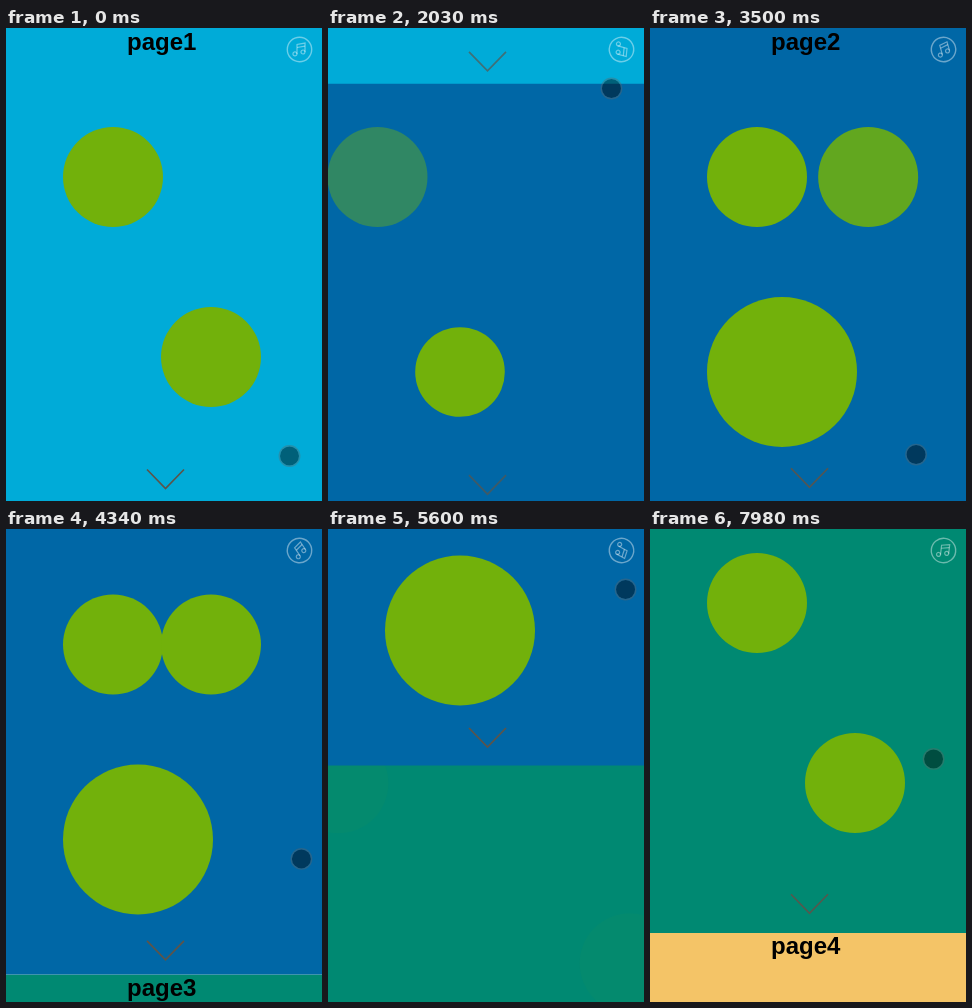
An HTML page with a canvas that plays this animation: 316x473 px, repeating every 8000 ms.

```html
<!DOCTYPE html>
<html lang="en">
<head>
<meta charset="utf-8">
<title>Swipe pages</title>
<style>
html, body { margin: 0; height: 100%; overflow: hidden; background: #fff; }
canvas { display: block; }
</style>
</head>
<body>
<canvas id="stage" width="316" height="473"></canvas>
<script>
const ctx = document.getElementById('stage').getContext('2d');
const LOOP = 8000, WIDTH = 316, HEIGHT = 473, PAGE = 479;
const DRAG_RATIO = 0.4, TOUCH_SPEED = 0.55, TOUCH_TOP = 60.5;
const SLIDE_TIME = 500, ENTER_TIME = 800;
const ICON_PERIOD = 885, ARROW_PERIOD = 1120;

// A disc enters `delay` ms after its page is released: `from` shifts it sideways, `scale` grows it.
const pages = [
  { color: '#00abd8', discs: [{ x: 107, y: 149, r: 50 }, { x: 205, y: 329, r: 50 }] },
  { color: '#0067a6', discs: [
    { x: 107, y: 149, r: 50, from: -100, delay: 60 },
    { x: 132, y: 344, r: 75, scale: 0.3, delay: 60 },
    { x: 205, y: 149, r: 50, from: 100, delay: 1275 }] },
  { color: '#008972', discs: [
    { x: 107, y: 149, r: 50, from: -100, delay: 60 },
    { x: 205, y: 329, r: 50, from: 100, delay: 60 }] },
  { color: '#f4c467', discs: [] }
];

const swipes = [
  { start: 603, release: 1765, y: 428 },
  { start: 4189, release: 5500, y: 413.5 },
  { start: 7640, release: Infinity, y: 417.5 }
];

const clamp = v => Math.min(1, Math.max(0, v));
const mix = (a, b, k) => a + (b - a) * k;
const smooth = v => v * v * (3 - 2 * v);

// cubic-bezier(.25, .1, .25, 1)
function ease(x) {
  x = clamp(x);
  const bezier = (p, q, s) => 3 * (1 - s) ** 2 * s * p + 3 * (1 - s) * s * s * q + s ** 3;
  let lo = 0, hi = 1;
  for (let i = 0; i < 20; i++) {
    const mid = (lo + hi) / 2;
    if (bezier(0.25, 0.25, mid) < x) lo = mid; else hi = mid;
  }
  return bezier(0.1, 1, lo);
}

const dragY = (swipe, t) =>
  Math.max(TOUCH_TOP, swipe.y - TOUCH_SPEED * Math.max(0, t - swipe.start));

// Up with each swipe, then back down and a slow drift to the next starting point.
function touchPoint(t) {
  const x = t < 2030 ? 283.5 : 283.5 - 24 * Math.sin((t - 2030) / 1983 * Math.PI);
  const next = swipes.findIndex(swipe => t < swipe.start);
  if (next === 0) return [x, swipes[0].y];
  const last = swipes[next < 0 ? swipes.length - 1 : next - 1];
  const held = dragY(last, t);
  if (next < 0) return [x, held];
  const { start, y } = swipes[next];
  const rest = y + 0.019 * (start - t);
  return [x, mix(held, rest, ease((t - last.release - 300) / 800))];
}

function circle(x, y, r) {
  ctx.beginPath();
  ctx.arc(x, y, r, 0, 2 * Math.PI);
}

function line(...points) {
  ctx.beginPath();
  points.forEach(([x, y]) => ctx.lineTo(x, y));
  ctx.stroke();
}

function drawDisc({ x, y, r, from = 0, scale = 1, delay = 0 }, age) {
  if (age < delay) return;
  const k = ease((age - delay) / ENTER_TIME);
  ctx.globalAlpha = from ? k : 1;
  ctx.fillStyle = '#72b10b';
  circle(x + from * (1 - k), y, r * mix(scale, 1, k));
  ctx.fill();
  ctx.globalAlpha = 1;
}

function drawArrow(t) {
  const p = (0.55 + t / ARROW_PERIOD) % 1;
  if (p < 0.3) return;
  const rising = p < 0.6;
  const k = smooth(rising ? (p - 0.3) / 0.3 : (p - 0.6) / 0.4);
  const y = 441 + (rising ? 7 * (1 - k) : -8 * k);
  ctx.globalAlpha = rising ? Math.min(1, 6 * k) : 1 - k;
  ctx.strokeStyle = '#5c544a';
  ctx.lineWidth = 1.7;
  line([141, y], [159.5, y + 19], [178, y]);
  ctx.globalAlpha = 1;
}

function drawPage(index, top, t) {
  if (top >= HEIGHT || top <= -PAGE) return;
  const { color, discs } = pages[index];
  const age = index ? t - swipes[index - 1].release : Infinity;
  ctx.save();
  ctx.translate(0, top);
  ctx.beginPath();
  ctx.rect(0, 0, WIDTH, PAGE);
  ctx.fillStyle = color;
  ctx.fill();
  ctx.clip();
  ctx.fillStyle = '#000';
  ctx.font = 'bold 24px "Liberation Sans", Arial, sans-serif';
  ctx.fillText('page' + (index + 1), 121, 21.5);
  discs.forEach(disc => drawDisc(disc, age));
  drawArrow(t);
  ctx.restore();
}

function drawMusic(t) {
  ctx.save();
  ctx.translate(293.5, 21.5);
  ctx.rotate(t / ICON_PERIOD * 2 * Math.PI);
  ctx.strokeStyle = 'rgba(255,255,255,.42)';
  ctx.lineWidth = 1.4;
  circle(0, 0, 12.2);
  ctx.stroke();
  ctx.lineWidth = 1.2;
  for (const [x, y] of [[-4.5, 4.5], [3.5, 2.5]]) {
    circle(x, y, 2);
    ctx.stroke();
  }
  line([-2.5, 4.5], [-2.5, -5], [5.5, -6.5], [5.5, 2.5]);
  line([-2.5, -2], [5.5, -3.5]);
  ctx.restore();
}

function drawTouch(t) {
  const [x, y] = touchPoint(t);
  circle(x, y, 9.5);
  ctx.fillStyle = 'rgba(0,0,0,.44)';
  ctx.fill();
  circle(x, y, 10.2);
  ctx.strokeStyle = 'rgba(100,100,100,.38)';
  ctx.lineWidth = 1.4;
  ctx.stroke();
}

function draw(t) {
  const index = swipes.findIndex(swipe => t < swipe.release + SLIDE_TIME);
  const swipe = swipes[index];
  const pulled = DRAG_RATIO * (dragY(swipe, t) - swipe.y);
  const since = t - swipe.release;

  ctx.fillStyle = '#fff';
  ctx.fillRect(0, 0, WIDTH, HEIGHT);
  // The next page settles sooner and is uncovered by the leaving one.
  drawPage(index + 1, mix(PAGE + pulled, 0, ease(2 * since / SLIDE_TIME)), t);
  drawPage(index, mix(pulled, -PAGE, ease(since / SLIDE_TIME)), t);
  drawMusic(t);
  drawTouch(t);
}

const begin = performance.now();
function tick() {
  draw((performance.now() - begin) % LOOP);
  requestAnimationFrame(tick);
}
tick();
</script>
</body>
</html>
```
